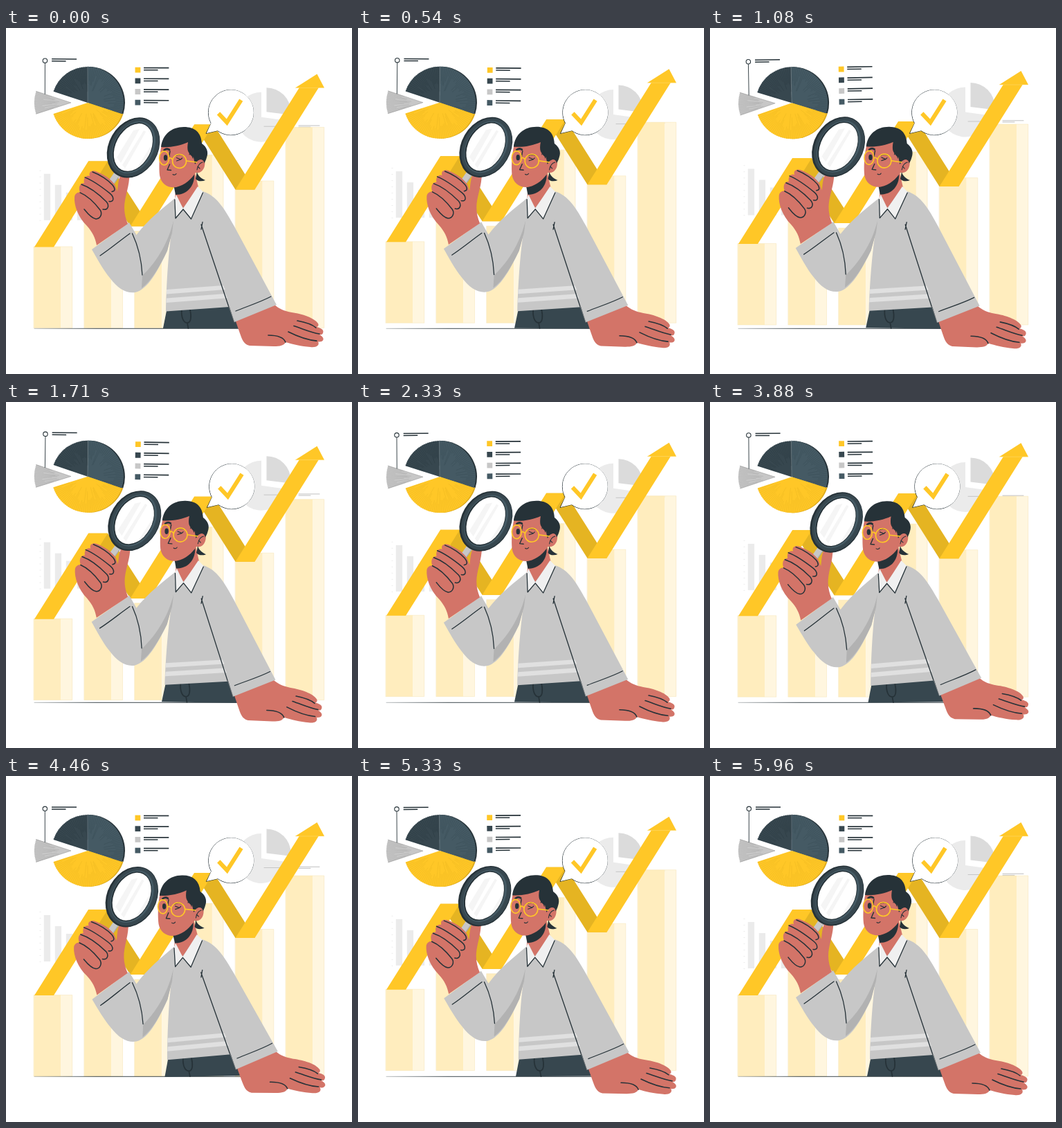
Recreate the animation shown at these times as an HTML page with a canvas. Size 500 by 500 pixels, loop 6 s.

```html
<!DOCTYPE html>
<html lang="en">
<head>
<meta charset="utf-8">
<title>Data analysis</title>
<style>
html, body { margin: 0; width: 100%; height: 100%; overflow: hidden; background: #fff; }
canvas { display: block; width: 100vw; height: 100vh; }
</style>
</head>
<body>
<canvas id="stage"></canvas>
<script>
const SIZE = 500, LOOP = 6000, STEP = 1000 / 24;
const YELLOW = '#FFC727', GOLD = '#E5B422', INK = '#263238', SLATE = '#37474F',
      STEEL = '#455A64', GREY = '#C7C7C7', SKIN = '#D37468';
const canvas = document.getElementById('stage');
const ctx = canvas.getContext('2d');
const dpr = Math.max(1, window.devicePixelRatio || 1);
canvas.width = canvas.height = SIZE * dpr;

// ---- drawing helpers ----
function fill(d, color) {
  ctx.fillStyle = color;
  ctx.fill(new Path2D(d));
}
function line(d, width = 1.5, color = INK, cap = 'round') {
  ctx.lineWidth = width;
  ctx.strokeStyle = color;
  ctx.lineCap = cap;
  ctx.lineJoin = cap === 'butt' ? 'miter' : 'round';
  ctx.stroke(new Path2D(d));
}
function rect(x, y, w, h, color) {
  ctx.fillStyle = color;
  ctx.fillRect(x, y, w, h);
}
function oval(x, y, rx, ry, tilt, color) {
  ctx.beginPath();
  ctx.ellipse(x, y, rx, ry, tilt * Math.PI / 180, 0, 7);
  ctx.fillStyle = color;
  ctx.fill();
}
function ring(x, y, rx, ry, width, color) {
  ctx.beginPath();
  ctx.ellipse(x, y, rx, ry, 0, 0, 7);
  ctx.lineWidth = width;
  ctx.strokeStyle = color;
  ctx.stroke();
}
function wedge(x, y, r, from, to, color) {
  const rad = Math.PI / 180;
  ctx.beginPath();
  ctx.moveTo(x, y);
  ctx.arc(x, y, r, from * rad, to * rad);
  ctx.closePath();
  ctx.fillStyle = color;
  ctx.fill();
}
function rand(i) {
  const s = Math.sin(i * 12.9898) * 43758.5453;
  return s - Math.floor(s);
}
function hatch(x, y, r, from, to, gap, color) {
  ctx.beginPath();
  for (let a = from + gap / 2, i = from + 400; a < to; a += gap, i++) {
    const c = Math.cos(a * Math.PI / 180), s = Math.sin(a * Math.PI / 180);
    const inner = r * (0.3 + 0.5 * rand(i));
    ctx.moveTo(x + c * inner, y + s * inner);
    ctx.lineTo(x + c * r, y + s * r);
  }
  ctx.lineWidth = 0.45;
  ctx.strokeStyle = color;
  ctx.stroke();
}

// ---- motion ----
const phase = (t, period) => (t % period) / period;
const rise = (t, period) => -10 * (1 - Math.abs(1 - 2 * phase(t, period)));
function sway(t, period) {
  const p = phase(t, period);
  const turn = p < 0.25 ? 4 * p : p < 0.75 ? 2 - 4 * p : 4 * p - 4;
  return turn * Math.PI / 180;
}
const SHAKE = [0, -1, 2, -4, 4, -4, 4, -4, 2, -1, 0];
function shake(t, period) {
  const p = phase(t, period) * 10, i = Math.floor(p);
  return SHAKE[i] + (SHAKE[i + 1] - SHAKE[i]) * (p - i);
}
function moved(dx, dy, draw) {
  ctx.save();
  ctx.translate(dx, dy);
  draw();
  ctx.restore();
}
function turned(x, y, angle, draw) {
  ctx.save();
  ctx.translate(x, y);
  ctx.rotate(angle);
  ctx.translate(-x, -y);
  draw();
  ctx.restore();
}

// ---- parts ----
function paleCharts() {
  const tops = [211, 227, 238, 250];
  tops.forEach((y, i) => rect(54.8 + i * 16, y, 9.3, 278 - y, '#EBEBEB'));
  for (let y = 206; y <= 278; y += 9) rect(48.5, y, 2, 0.7, '#E4E4E4');

  wedge(369, 129, 36, 8, 270, '#EBEBEB');
  wedge(376.5, 121.5, 35, -90, 7, '#DBDBDB');
  line('M373 142.5H414', 0.8, '#BDBDBD');
  line('M423 141.3H453M423 143.4H440', 0.9, '#B8B8B8');
}

function barsAndArrow() {
  [316.5, 278, 294, 184, 221.5, 144].forEach((y, i) => {
    const x = 40.3 + i * 72.8, h = 434 - y;
    rect(x, y, 39.2, h, '#FFEDBE');
    rect(x + 39.2, y, 16.2, h, '#FFF6DF');
    ctx.lineWidth = 0.4;
    ctx.strokeStyle = '#F3DFA6';
    ctx.strokeRect(x, y, 55.4, h);
  });
  fill('M119 193H147L207.500 287H179.500ZM272 140H300L359.500 234H331.500Z', GOLD);
  fill('M41 317L119 193H147L69 317ZM179.500 287L272 140H300L207.500 287ZM331.500 234L424 86.500H452L359.500 234Z', YELLOW);
  fill('M418 87L449.500 67L460 87Z', YELLOW);
  line('M418 87H460', 0.4, '#FFE08A', 'butt');
}

function pieChart() {
  const x = 118, y = 108, r = 52;
  wedge(x + 2, y, r, -90, 18, INK);
  wedge(x + 2, y, r, 18, 120, '#DDAA1C');
  wedge(x, y, r, 198, 270, SLATE);
  wedge(x, y, r, -90, 18, STEEL);
  wedge(x, y, r, 18, 162, YELLOW);
  hatch(x, y, r, 198, 270, 3.2, '#2A3840');
  hatch(x, y, r, -90, 18, 3.2, '#374A53');
  hatch(x, y, r, 18, 162, 3.2, '#E8B521');
  line('M118 108V56', 0.6, '#7B8990');
  wedge(94, 108, 53, 162, 198, GREY);
  hatch(94, 108, 53, 162, 198, 2.6, '#A3A3A3');
  line('M43.600 91.600L94 108L43.600 124.400', 0.5, '#8D8D8D');

  line('M56.300 50.500V95.500', 0.9);
  oval(56.3, 47.3, 3.2, 3.2, 0, '#fff');
  ring(56.3, 47.3, 3.2, 3.2, 1.1, INK);
  line('M66 45H102M66 48H86.500', 1.5, INK, 'butt');

  [YELLOW, SLATE, GREY, STEEL].forEach((color, i) => {
    const top = 56.6 + i * 15.7;
    rect(186.500, top, 7.8, 7.8, color);
    rect(199, top, 36.3, 1.7, INK);
    rect(199, top + 3.3, 20.5, 1.5, INK);
  });
}

function bubble() {
  const d = 'M296.500 137.500A32.600 32.600 0 1 1 306 148.400L289.800 152.300Z';
  line(d, 1);
  moved(0.35, -0.2, () => fill(d, '#fff'));
  line('M307.300 123.400L319.500 136.300L340 104.200', 6, YELLOW, 'butt');
}

function torso() {
  fill('M233 404L227 434H341L325 398Z', SLATE);
  line('M254 407C253 417 256 426 262 426C268 426 268 416 266 407M262 426L263.500 434', 1.7);

  fill('M331 421L388 400C395 406 402 409 413 411C428 413 446 419 451 427C453 431 449 432 449 432C457 434 460 437 458 441C457 444 454 443 453 443C460 447 460 451 456 453C452 454 451 453 451 453C454 459 448 462 440 461C427 460 414 457 404 454C402 459 396 460 387 460L352 459C343 457 341 449 338 441Z', SKIN);
  line('M421 423C432 425 442 428 448 433M416 430.500C430 435 441 440 453 442M408 439C422 446 435 451 449 452M379 444C390 444 401 446 404 454', 1.6);

  fill('M244 247L284 236C304 242 315 260 329 285L391 400L330 425L323 403L231 409.500C232 365 235 320 240 290Z', GREY);
  fill('M232 378L314 372L317 378L232 384.500ZM232 390.500L317 384L320 390.300L231.500 397Z', '#E0E0E0');
  line('M282 284L322 403M284 280.500L282 291', 1.3);
  line('M322 402L330 425', 0.7, '#8B8B8B');
  line('M332 409C349 402 368 396 383 388', 1.2);
}

function leftSleeve() {
  fill('M244 246C225 262 206 276 188.500 299L178 281L124 320C132 334 141 350 150 361C162 377 174 384 187 382C205 378 220 350 233 322L241 290Z', GREY);
  fill('M242 278C236 306 220 336 197 358L196 376C210 366 222 345 233 322L240 296Z', '#B2B2B2');
  line('M182.500 297C191 315 196 337 197 357', 1.3);
  line('M136 329C151 319 165 307 179 297', 1.3);
}

function head() {
  fill('M246 228L272 205L278 230L256 260L244 246Z', SKIN);
  fill('M242 226L272 211C273 228 262 241 245 241Z', INK);
  fill('M225 168C221 185 221 203 222 213C224 225 234 232 246 230C259 227 268 218 274 209C283 211 289 202 287 191L278 156H232Z', SKIN);

  fill('M224 172C226 154 239 143 257 143C273 143 282 151 283 167C290 172 293 179 290 187C289 191 287 195 285 197C286 190 281 188 276 193L273 197L271 187C267 185 265 182 263 178C262 175 262 170 263 165C252 170 237 173 224 172Z', INK);
  fill('M276 207C276 212 281 217 288 220C283 222 277 222 274 218Z', INK);
  fill('M275 194C280 187 288 190 286 199C284 207 279 210 273 208Z', SKIN);
  line('M265 183L267 177L270 188', 1.1);
  line('M276 205C277 199 280 195 284 194M277 200L280 203', 1.1);

  line('M228.500 176.500C231 174.500 234 174.500 236 176', 2.8);
  line('M245.500 184.500C249 182.500 253 182.500 256 184.500', 1.4);
  oval(230.500, 187.500, 2.7, 4.2, 0, INK);
  line('M246.500 187.500L252.500 190L246.500 192M252.500 190L254.500 188', 1.2);
  line('M237 178L235.500 187M236.500 197L233 205L238.500 205.500', 1.4);
  line('M241 211.500C243 213 245 212 246 210.500', 1.1);
  ring(228.500, 188, 7, 10, 1.6, YELLOW);
  ring(250.500, 192.500, 10, 10, 1.6, YELLOW);
  line('M235.500 188.500C237 187 239 188 240.500 190M260.500 192L275.500 194', 1.6, YELLOW);

  fill('M246 241L256 261L245 275L243.500 247ZM277 229L285 237L267.500 276L256 261Z', '#F0F0F0');
  line('M243.800 248L245 275L256 262L267.500 276L284.500 238', 1.3);
}

function magnifier() {
  // thumb and palm sit behind the rim, fingers in front of the handle
  fill('M131 314C129 303 125 295 117 286C104 273 98 256 99 244C100 238 106 237 107 238C104 230 107 224 113 224C111 216 117 212 121 214C119 208 125 205 131 208C144 213 157 221 159 231L161 236C162 224 163 211 171 206C178 203 180 210 178 218C177 232 171 246 171 260C171 268 173 276 176 283Z', SKIN);
  line('M164 206L152.500 222.500', 9, GREY, 'butt');
  line('M168 208L156.500 224.500', 1.2, '#A9A9A9', 'butt');
  fill('M121 213C119 207 126 205 132 208C145 214 157 222 158 230C159 236 155 239 151 237Z', SKIN);
  line('M125 208C136 212 148 220 154 227C158 232 158 236 153 236.500', 1.5);
  line('M114 216C127 221 140 231 150 239C157 245 156 252 149 250.500', 1.5);
  line('M109 226C124 231 137 243 145 251C150 257 147 264 140 262', 1.5);
  line('M107 238C119 243 129 254 136 263C140 269 136 276 130 276C123 275 117 267 113 262', 1.5);

  oval(184, 173, 46, 35.5, -60, INK);
  oval(185, 172.800, 44.3, 33.6, -60, SLATE);
  oval(184.300, 172.500, 40, 28.8, -61, STEEL);
  oval(183.300, 172.500, 38, 26.8, -62, INK);
  oval(183.800, 172.500, 36.5, 25.3, -62, '#fff');
  ctx.save();
  ctx.beginPath();
  ctx.ellipse(183.800, 172.500, 36.5, 25.3, -62 * Math.PI / 180, 0, 7);
  ctx.clip();
  fill('M160 187L184 148L193 146L166 195ZM168 198L199 148L202 150L172 203ZM188 204L209 171V180L193 204Z', '#F5F5F5');
  ctx.restore();
}

function person() {
  torso();
  leftSleeve();
  head();
  magnifier();
}

function baseline() {
  const g = ctx.createLinearGradient(40, 0, 130, 0);
  g.addColorStop(0, 'rgba(38,50,56,.35)');
  g.addColorStop(1, INK);
  line('M41 434.300H340', 0.9, g);
}

function render(now) {
  const t = (Math.floor((now % LOOP + 4) / STEP) + 1) * STEP;
  ctx.setTransform(dpr, 0, 0, dpr, 0, 0);
  rect(0, 0, SIZE, SIZE, '#fff');
  moved(0, rise(t, 3000), paleCharts);
  moved(0, rise(t, 1500), barsAndArrow);
  turned(138, 102, sway(t, 1500), pieChart);
  moved(shake(t, 1500), 0, bubble);
  baseline();
  turned(279, 296, sway(t, 6000), person);
}

let start = null;
function tick(now) {
  if (start === null) start = now;
  render(now - start);
  requestAnimationFrame(tick);
}
render(0);
requestAnimationFrame(tick);
</script>
</body>
</html>
```
